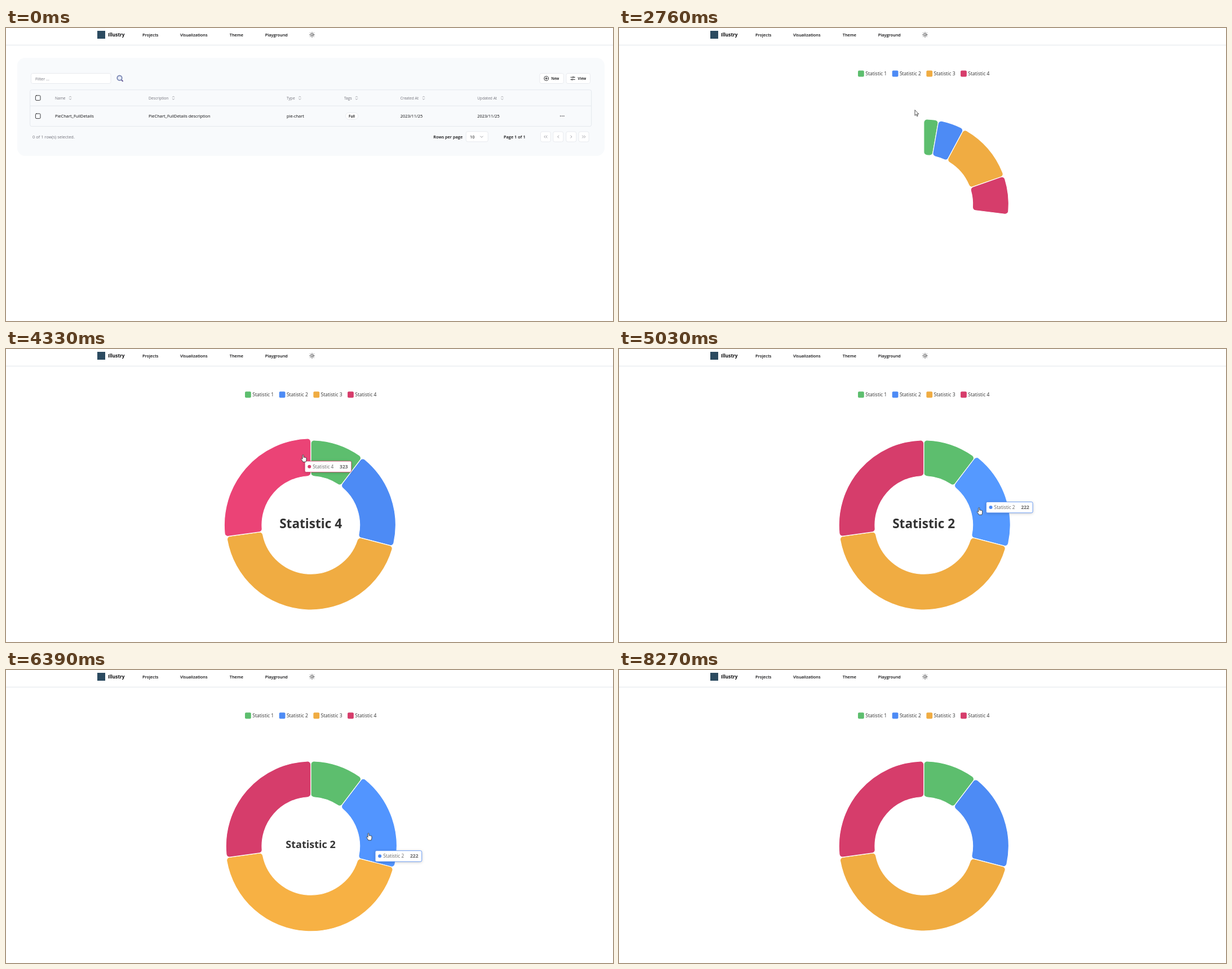
These frames come from a looping animation (1077x520 px, 8.34 s). An HTML page:

```html
<!DOCTYPE html>
<html lang="en">
<head>
<meta charset="utf-8">
<title>Chart dashboard</title>
<style>
  html, body { margin: 0; width: 100%; height: 100%; overflow: hidden; background: #fff; }
  svg { display: block; width: 100%; height: 100%; }
  text { font: 7.45px "Open Sans", "Noto Sans", sans-serif; fill: #09090b; white-space: pre; }
  .nav text { font-size: 7.33px; font-weight: 600; }
  .nav .brand { font-size: 8.3px; font-weight: 700; }
  .head text { font-size: 6.6px; font-weight: 500; fill: #71717a; }
  .strong { font-size: 7.4px; font-weight: 600; }
  .small { font-size: 6.45px; font-weight: 600; }
  .muted { fill: #71717a; }
  .menu text { font-size: 7.6px; }
  .menu .keys { font: 6px "DejaVu Sans", sans-serif; fill: #8b8b92; }
  .legend text { font-size: 8.55px; fill: #333; }
  .box { fill: #fff; stroke: #e4e6eb; stroke-width: .8; }
  .icon { fill: none; stroke: #18181b; stroke-width: .85; stroke-linecap: round; stroke-linejoin: round; }
  .faint { stroke: #8f8f96; }
  #label { font-weight: 700; fill: #333; text-anchor: middle; }
  #tip { filter: drop-shadow(.6px 1.2px 2.5px rgba(0, 0, 0, .2)); }
  #tip text { font-size: 8.3px; fill: #666; }
  #tip .value { font-size: 8.45px; font-weight: 700; }
  .menu { filter: drop-shadow(0 1.5px 2px rgba(0, 0, 0, .12)); }
</style>
</head>
<body>
<svg viewBox="0 0 1077 520">
  <g class="nav">
    <path d="M0 30.3H1077" stroke="#e2e5ea"/>
    <rect x="162" y="5" width="14" height="14" fill="#2b4a60"/>
    <text class="brand" x="181" y="15">Illustry</text>
    <text x="242" y="14.8">Projects</text>
    <text x="309" y="14.8">Visualizations</text>
    <text x="396.8" y="14.8">Theme</text>
    <text x="459.7" y="14.8">Playground</text>
    <g class="icon" transform="translate(543 12)">
      <circle r="2.1"/>
      <path d="M0-4.5V-3.7M0 3.7V4.5M-4.5 0H-3.7M3.7 0H4.5M-3.2-3.2L-2.6-2.6M2.6 2.6L3.2 3.2M-3.2 3.2L-2.6 2.6M2.6-2.6L3.2-3.2"/>
    </g>
  </g>

  <g id="table">
    <rect x="20" y="53" width="1042" height="174" rx="14" fill="#f8fafc"/>
    <rect class="box" x="44.5" y="80.5" width="141.5" height="18" rx="3"/>
    <text class="muted" x="52" y="92.6" style="font-size:7.35px">Filter ...</text>
    <path d="M205 92.3L207 94.3" stroke="#6b5f9a" stroke-width="2" stroke-linecap="round"/>
    <circle cx="201.5" cy="88.7" r="4.2" fill="#e9eef8" stroke="#7c88b4" stroke-width="1.9"/>

    <rect class="box" x="947" y="80.5" width="42.5" height="18" rx="3"/>
    <rect class="box" x="994" y="80.5" width="42.5" height="18" rx="3"/>
    <g class="icon">
      <circle cx="958.6" cy="89.5" r="3.9"/>
      <path d="M956.6 89.5H960.6M958.6 87.5V91.5"/>
      <path d="M1002 87.4H1005.5M1007.5 87.4H1009.5M1002 91.4H1003.5M1005.5 91.4H1009.5"/>
      <circle cx="1006.5" cy="87.4" r="1.1"/><circle cx="1004.5" cy="91.4" r="1.1"/>
    </g>
    <text class="small" x="967.5" y="92.2">New</text>
    <text class="small" x="1014.6" y="92.2">View</text>

    <rect id="row" x="43" y="138.5" width="995.5" height="36" fill="#f9fafa"/>
    <rect x="42.7" y="109.8" width="996" height="64.8" rx="3" fill="none" stroke="#e2e6ec" stroke-width=".9"/>
    <path d="M43 138.2H1038.5" stroke="#e2e6ec" stroke-width=".9"/>
    <g class="icon">
      <rect x="52.4" y="119.8" width="8.6" height="8.6" rx="1.6"/>
      <rect x="52.4" y="152" width="8.6" height="8.6" rx="1.6"/>
    </g>
    <g class="head" id="head"></g>
    <text x="87" y="159">PieChart_FullDetails</text>
    <text x="253" y="159">PieChart_FullDetails description</text>
    <text x="498" y="159">pie-chart</text>
    <rect class="box" x="602.4" y="150.3" width="22.4" height="11.8" rx="5.9"/>
    <text class="small" x="608" y="158.7">Full</text>
    <text x="699.7" y="159">2023/11/25</text>
    <text x="836.3" y="159">2023/11/25</text>
    <rect id="dotsHover" x="978" y="147.5" width="18" height="17.5" rx="3" fill="#f1f2f3"/>
    <path d="M983.8 156.2h.01M986.8 156.2h.01M989.8 156.2h.01" class="icon" style="stroke-width:1.6"/>

    <text class="muted" x="47" y="195.7">0 of 1 row(s) selected.</text>
    <text class="strong" x="758.3" y="195.7">Rows per page</text>
    <rect class="box" x="816.3" y="183.8" width="39" height="18" rx="3"/>
    <text x="823" y="195.7">10</text>
    <path class="icon faint" d="M841.6 192L843.9 194.3L846.2 192"/>
    <text class="strong" x="883" y="195.7">Page 1 of 1</text>
    <g id="pager"></g>

    <g class="menu" id="menu">
      <rect class="box" x="906" y="168.3" width="89.7" height="45.5" rx="3"/>
      <rect id="viewHover" x="908.8" y="171" width="84.2" height="17.3" rx="2" fill="#f4f4f5"/>
      <text x="912.8" y="182.4">View</text>
      <text x="912.8" y="205.6">Delete</text>
      <text class="keys" x="973.3" y="205.2">⌘</text>
      <text class="keys" x="980" y="205.2">⌫</text>
    </g>
  </g>

  <g id="chart">
    <g class="legend" id="legend"></g>
    <g id="pie" stroke="#fff" stroke-width="1.2"></g>
    <text id="label"></text>
    <g id="tip">
      <rect x=".5" y=".5" width="82.6" height="19.4" rx="2.4" fill="#fff" stroke-width=".8"/>
      <circle cx="8.6" cy="10.2" r="3"/>
      <text x="14.6" y="13.1"></text>
      <text class="value" x="62.4" y="13.1"></text>
    </g>
  </g>

  <g id="cursor" fill="#fff" stroke="#222" stroke-width=".8" stroke-linejoin="round">
    <path id="arrow" d="M0 0V9.8L2.3 7.8L3.8 11.2L5.3 10.5L3.8 7.2H6.9Z"/>
    <path id="hand" d="M-1 1a1 1 0 0 1 2 0V4.6l.3-.1a.9.9 0 0 1 1.6.3a.9.9 0 0 1 1.7.4a.9.9 0 0 1 1.3.8V8.5Q5.8 10.5 5 12.5H-.3Q-1.5 10-3.4 7.6c-.5-1 .9-1.6 1.6-.8L-1 7.6Z"/>
  </g>
</svg>

<script>
const LOOP = 8340;
const CLOSE_MENU = 1970, LEAVE_TABLE = 2250, CHART_START = 2354;
const CENTER = [540.8, 312.4], OUTER = 150.6, INNER = 86.8, CORNER = 5.6;

const values = [123, 222, 521, 323];
const colors = [[93, 190, 110], [77, 139, 245], [240, 172, 66], [214, 61, 107]];
const total = values.reduce((a, b) => a + b);

// Time at which each sector becomes hovered, -1 for none
const hovers = [[3570, 3], [4420, 0], [4730, 1], [5330, 2], [6290, 1], [6800, -1]];
// Pointer path: time, x, y
const path = [
  [110, 1012, 437], [450, 1008, 300], [800, 988, 158], [960, 986, 160], [1090, 960, 177.5],
  [1970, 960, 177.5], [2300, 760, 160], [2760, 525, 145.5], [2900, 524, 146], [3490, 511.5, 163],
  [3630, 506, 171], [4040, 505, 186], [4190, 505, 186], [4420, 541, 189], [4730, 611, 214],
  [4970, 639, 259], [5030, 638.8, 281.5], [5330, 640, 340], [5800, 612, 372], [6180, 612, 372],
  [6290, 641, 339], [6330, 642.6, 309], [6390, 643, 289.5], [6620, 662, 306], [6800, 688, 330],
  [6940, 958, 476], [7030, 989, 497], [7100, 989, 497], [7870, 1059, 518]
];

const $ = id => document.getElementById(id);
const clamp = x => Math.min(1, Math.max(0, x));
const cubicOut = p => 1 - (1 - p) ** 3;
const cubicInOut = p => p < .5 ? 4 * p ** 3 : 1 - 4 * (1 - p) ** 3;
const rgb = (c, lift = 0) => `rgb(${c.map(v => Math.min(255, Math.round(v * (1 + .1 * lift))))})`;
const show = (el, on) => el.style.display = on ? '' : 'none';

const columns = [['Name', 87, 114], ['Description', 253, 297], ['Type', 498, 521.3],
  ['Tags', 600, 622], ['Created At', 699.7, 741], ['Updated At', 836.3, 880.4]];
$('head').innerHTML = columns.map(([name, x, icon]) =>
  `<text x="${x}" y="126.6">${name}</text>
   <path class="icon faint" d="M${icon - 1.7} 122.9l1.7-1.7l1.7 1.7m-3.4 2.6l1.7 1.7l1.7-1.7"/>`).join('');

const left = x => `M${x + 1} 190.9l-2.1 2.1l2.1 2.1`;
const right = x => `M${x - 1} 190.9l2.1 2.1l-2.1 2.1`;
const pages = [[957.5, x => left(x - 1.6) + left(x + 1.6)], [979.8, left],
  [1002.8, right], [1025.2, x => right(x - 1.6) + right(x + 1.6)]];
$('pager').innerHTML = pages.map(([x, d]) =>
  `<rect class="box" x="${x - 9}" y="184" width="18" height="18" rx="3"/>
   <path class="icon faint" d="${d(x)}"/>`).join('');

$('legend').innerHTML = colors.map((c, i) => {
  const x = 424 + 60.7 * i;
  return `<rect x="${x}" y="75.6" width="10.8" height="10.8" rx="2" fill="${rgb(c)}"/>
    <text x="${x + 13.2}" y="84.3">Statistic ${i + 1}</text>`;
}).join('');

$('pie').innerHTML = '<path/>'.repeat(values.length);
const sectors = [...$('pie').children];
const [tipBox, tipDot, tipName, tipValue] = $('tip').children;

function point(radius, angle) {
  return [CENTER[0] + radius * Math.sin(angle), CENTER[1] - radius * Math.cos(angle)]
    .map(v => v.toFixed(2)).join(' ');
}

// Ring sector with four rounded corners
function sectorPath(from, to, outer) {
  const s = Math.sin(Math.min((to - from) / 2, Math.PI / 2));
  const c = Math.min(CORNER, INNER * s / (1 - s + 1e-6));
  const turnOut = Math.asin(c / (outer - c)), turnIn = Math.asin(c / (INNER + c));
  const sideOut = Math.sqrt((outer - c) ** 2 - c * c), sideIn = Math.sqrt((INNER + c) ** 2 - c * c);
  const big = (a, b) => +(b - a > Math.PI);
  const round = p => `A${c} ${c} 0 0 1 ${p}`;
  return `M${point(sideOut, from)}${round(point(outer, from + turnOut))}` +
    `A${outer} ${outer} 0 ${big(from + turnOut, to - turnOut)} 1 ${point(outer, to - turnOut)}` +
    `${round(point(sideOut, to))}L${point(sideIn, to)}${round(point(INNER, to - turnIn))}` +
    `A${INNER} ${INNER} 0 ${big(from + turnIn, to - turnIn)} 0 ${point(INNER, from + turnIn)}` +
    `${round(point(sideIn, from))}Z`;
}

function pointerAt(t) {
  const next = path.findIndex(k => k[0] > t);
  if (next === 0) return path[0].slice(1);
  if (next < 0) return path.at(-1).slice(1);
  const [a, b] = [path[next - 1], path[next]];
  const p = (t - a[0]) / (b[0] - a[0]);
  return [a[1] + (b[1] - a[1]) * p, a[2] + (b[2] - a[2]) * p];
}

function emphasis(i, t) {
  let from = 0, to = 0, start = 0;
  const value = at => from + (to - from) * cubicOut(clamp((at - start) / 300));
  for (const [at, sector] of hovers) {
    if (at > t) break;
    const target = +(sector === i);
    if (target !== to) [from, to, start] = [value(at), target, at];
  }
  return value(t);
}

function drawTable(t) {
  show($('row'), t >= 740 && t < CLOSE_MENU + 70);
  show($('dotsHover'), t >= 800 && t < CLOSE_MENU + 70);
  show($('menu'), t >= 910 && t < CLOSE_MENU);
  show($('viewHover'), t >= 1020);
}

function drawChart(t, hovered) {
  const sweep = 2 * Math.PI * cubicInOut(clamp((t - CHART_START) / 1000));
  let angle = 0;
  sectors.forEach((el, i) => {
    const end = angle + sweep * values[i] / total, lift = emphasis(i, t);
    el.setAttribute('d', sweep > .02 ? sectorPath(angle, end, OUTER + 2.9 * lift) : '');
    el.setAttribute('fill', rgb(colors[i], lift));
    angle = end;
  });

  const label = $('label');
  show(label, hovered >= 0);
  if (hovered >= 0) {
    const size = 7 + 15.6 * emphasis(hovered, t);
    label.textContent = `Statistic ${hovered + 1}`;
    label.style.fontSize = size + 'px';
    label.setAttribute('x', 540.6);
    label.setAttribute('y', 310 + .357 * size);
  }

  // The tooltip trails the pointer and fades shortly after it leaves
  const [first, last] = [hovers[0][0], hovers.at(-1)[0]];
  const opacity = clamp((t - first) / 200) * (1 - clamp((t - last - 100) / 200));
  show($('tip'), opacity > 0);
  if (opacity > 0) {
    const i = hovered >= 0 ? hovered : hovers.at(-2)[1];
    const [x, y] = pointerAt(Math.min(t - 60, last));
    $('tip').setAttribute('transform', `translate(${x + 12} ${y + 11.5})`);
    $('tip').style.opacity = opacity;
    tipBox.setAttribute('stroke', rgb(colors[i]));
    tipDot.setAttribute('fill', rgb(colors[i]));
    tipName.textContent = `Statistic ${i + 1}`;
    tipValue.textContent = values[i];
  }
}

function draw(t) {
  const past = hovers.filter(h => h[0] <= t);
  const hovered = past.length ? past.at(-1)[1] : -1;
  show($('table'), t < LEAVE_TABLE);
  show($('chart'), t >= CHART_START);
  drawTable(t);
  drawChart(t, hovered);

  show($('cursor'), (t >= 110 && t < 7100) || (t >= 7870 && t < 8200));
  show($('arrow'), hovered < 0);
  show($('hand'), hovered >= 0);
  $('cursor').setAttribute('transform', `translate(${pointerAt(t)})`);
}

const start = performance.now();
function tick() {
  draw((performance.now() - start) % LOOP);
  requestAnimationFrame(tick);
}
tick();
</script>
</body>
</html>
```
